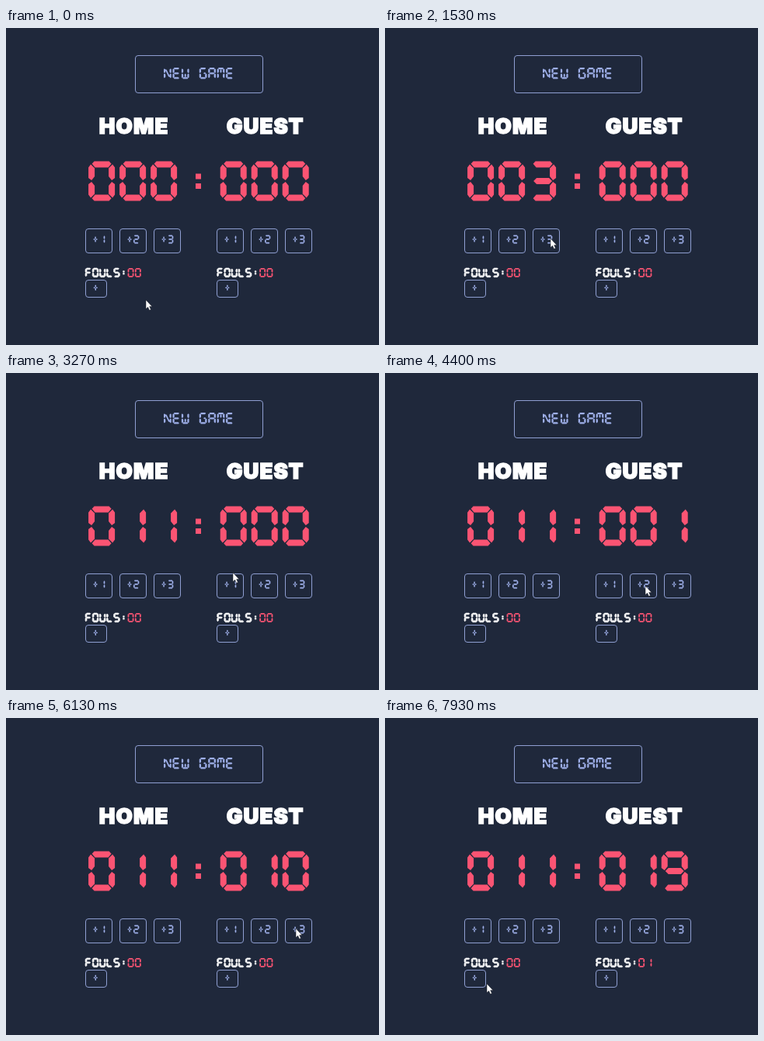
Recreate the animation shown at these times as an HTML page. Size 480x408 px, loop 8000 ms.

```html
<!DOCTYPE html>
<html lang="en">
<head>
<meta charset="utf-8">
<title>Scoreboard</title>
<style>
  html, body { margin: 0; width: 100%; height: 100%; overflow: hidden; background: #1f283b; }
  svg { display: block; width: 480px; height: 408px; }
  .team { font: 900 27.5px Inter, "Open Sans", sans-serif; letter-spacing: 1.1px; fill: #fff; stroke: #fff; stroke-width: 1.5; text-anchor: middle; }
  .box { fill: none; stroke: #8f9fd2; stroke-width: 1; }
  .label { fill: #9fb0ea; }
  .bold { fill: #fff; stroke: #fff; stroke-width: 3; }
  .lit { fill: #fb5473; }
</style>
</head>
<body>
<svg id="board" viewBox="0 0 480 408" role="img" aria-label="Basketball scoreboard">
  <text class="team" x="164.6" y="136">HOME</text>
  <text class="team" x="333.6" y="136">GUEST</text>
</svg>
<script>
(() => {
  const board = document.getElementById('board');
  const LOOP = 8000, STEP = 1000 / 15;

  // Segments live in a 34 x 51 cell; characters advance by 40.
  const W = 34, H = 51, ADVANCE = 40, MID = H / 2;
  const flipX = pts => pts.map(([x, y]) => [W - x, y]);
  const flipY = pts => pts.map(([x, y]) => [x, H - y]);

  // Bar of half-thickness r with pointed ends.
  function bar(x0, y0, x1, y1, r) {
    const len = Math.hypot(x1 - x0, y1 - y0);
    const dx = (x1 - x0) / len * r, dy = (y1 - y0) / len * r;
    return [[x0, y0], [x0 + dx - dy, y0 + dy + dx], [x1 - dx - dy, y1 - dy + dx],
            [x1, y1], [x1 - dx + dy, y1 - dy - dx], [x0 + dx + dy, y0 + dy - dx]];
  }
  const dot = y => [[13, y], [20, y], [20, y + 7], [13, y + 7]];

  const cap = [[7.5, 0], [26.5, 0], [29.5, 3.2], [25.5, 8], [8.5, 8], [4.5, 3.2]];
  const side = [[0, 8], [3, 4], [8, 9], [8, 19.5], [4, 24.5], [0, 21.5]];
  const stem = bar(17, 8, 17, 24, 3.5);
  const arm = bar(4, MID, 15.5, MID, 3.5);
  const SEG = {
    a: cap, d: flipY(cap),
    f: side, b: flipX(side), e: flipY(side), c: flipX(flipY(side)),
    g: bar(5, MID, 29, MID, 4),
    i: stem, l: flipY(stem), h: arm, j: flipX(arm),
    n: bar(9, 8, 25, 42, 3), p: dot(16), q: dot(28.5)
  };
  const GLYPH = {
    0: 'abcdef', 1: 'bc', 2: 'abged', 3: 'abgcd', 4: 'fgbc', 5: 'afgcd',
    6: 'afgedc', 7: 'abc', 8: 'abcdefg', 9: 'abcdfg',
    N: 'febcn', E: 'afged', W: 'febcdl', G: 'afedcj', A: 'abcefg', M: 'abcefi',
    F: 'afge', O: 'abcdef', U: 'febcd', L: 'fed', S: 'afgcd',
    '+': 'ilhj', ':': 'pq', ' ': ''
  };
  const outline = key => 'M' + SEG[key].map(p => p.join(' ')).join('L') + 'Z';

  function add(tag, attrs) {
    const el = document.createElementNS('http://www.w3.org/2000/svg', tag);
    for (const k in attrs) el.setAttribute(k, attrs[k]);
    return board.appendChild(el);
  }

  // Returns a setter that redraws the string when it changes.
  function segText(x, y, scale, cls, str) {
    const group = add('g', { class: cls, transform: `translate(${x} ${y}) scale(${scale})` });
    let shown;
    const set = s => {
      if (s === shown) return;
      shown = s;
      group.setAttribute('aria-label', s);
      group.innerHTML = [...s].map((ch, i) =>
        `<path transform="translate(${i * ADVANCE})" d="${[...GLYPH[ch]].map(outline).join('')}"/>`
      ).join('');
    };
    set(str);
    return set;
  }

  function button(x, y, w, h) {
    add('rect', { class: 'box', x: x + .5, y: y + .5, width: w, height: h, rx: 3.5 });
  }

  function panel(x) {
    const score = segText(x + 4.5, 171.5, 1, 'lit', '000');
    for (let i = 0; i < 3; i++) {
      const bx = Math.round(x + i * 44.1);
      button(bx, 258, 34, 31);
      segText(bx + 9.4, 266.5, .215, 'label', '+' + (i + 1));
    }
    segText(x + .5, 309, .228, 'bold', 'FOULS:');
    const fouls = segText(x + 55, 309, .232, 'lit', '00');
    button(Math.round(x), 324, 27, 22);
    segText(x + 10, 328.7, .215, 'label', '+');
    return { score, fouls };
  }

  button(166, 35, 164, 48);
  segText(203, 51, .286, 'label', 'NEW GAME');
  const home = panel(101.6), guest = panel(271.2);
  segText(231, 171.5, 1, 'lit', ':');

  const cursor = add('path', {
    d: 'M0 0V11.6L2.6 9.2L4.5 13.3L6.5 12.4L4.7 8.4H8Z',
    fill: '#fff', stroke: '#10141f', 'stroke-width': .5
  });

  // Pointer moves: [first step, last step, x, y]
  const moves = [
    [0, 4, 308, 294], [6, 10, 116, 268], [10, 13, 160, 270], [17, 22, 213, 271],
    [29, 36, 159, 270], [40, 44, 213, 270], [48, 49, 292, 257], [49, 51, 301, 265],
    [57, 58, 287, 272], [61, 66, 335, 274], [82, 88, 373, 271],
    [102, 105, 304, 349], [105, 109, 284, 334], [113, 119, 131, 342]
  ];

  // Button clicks: [step, points]
  const homeClicks = [[23, 3], [29, 3], [40, 2], [49, 3]];
  const guestClicks = [[61, 1], [72, 2], [79, 2], [82, 2], [92, 3], [94, 3], [98, 3], [102, 3]];
  const guestFouls = [[114, 1]];

  const total = (clicks, n, digits) =>
    String(clicks.reduce((sum, [at, pts]) => sum + (at <= n ? pts : 0), 0)).padStart(digits, '0');

  function pointerAt(n) {
    let x = 180, y = 350;
    for (const [from, to, tx, ty] of moves) {
      const k = Math.min(1, Math.max(0, (n - from) / (to - from)));
      const ease = k * k * (3 - 2 * k);
      x += (tx - x) * ease;
      y += (ty - y) * ease;
    }
    return [x, y].map(Math.round);
  }

  function draw(ms) {
    const n = Math.floor((ms % LOOP + 4) / STEP) % 120;
    home.score(total(homeClicks, n, 3));
    guest.score(total(guestClicks, n, 3));
    guest.fouls(total(guestFouls, n, 2));
    cursor.setAttribute('transform', `translate(${pointerAt(n).join(' ')})`);
  }

  const start = performance.now();
  function tick() {
    draw(performance.now() - start);
    requestAnimationFrame(tick);
  }
  tick();
})();
</script>
</body>
</html>
```
